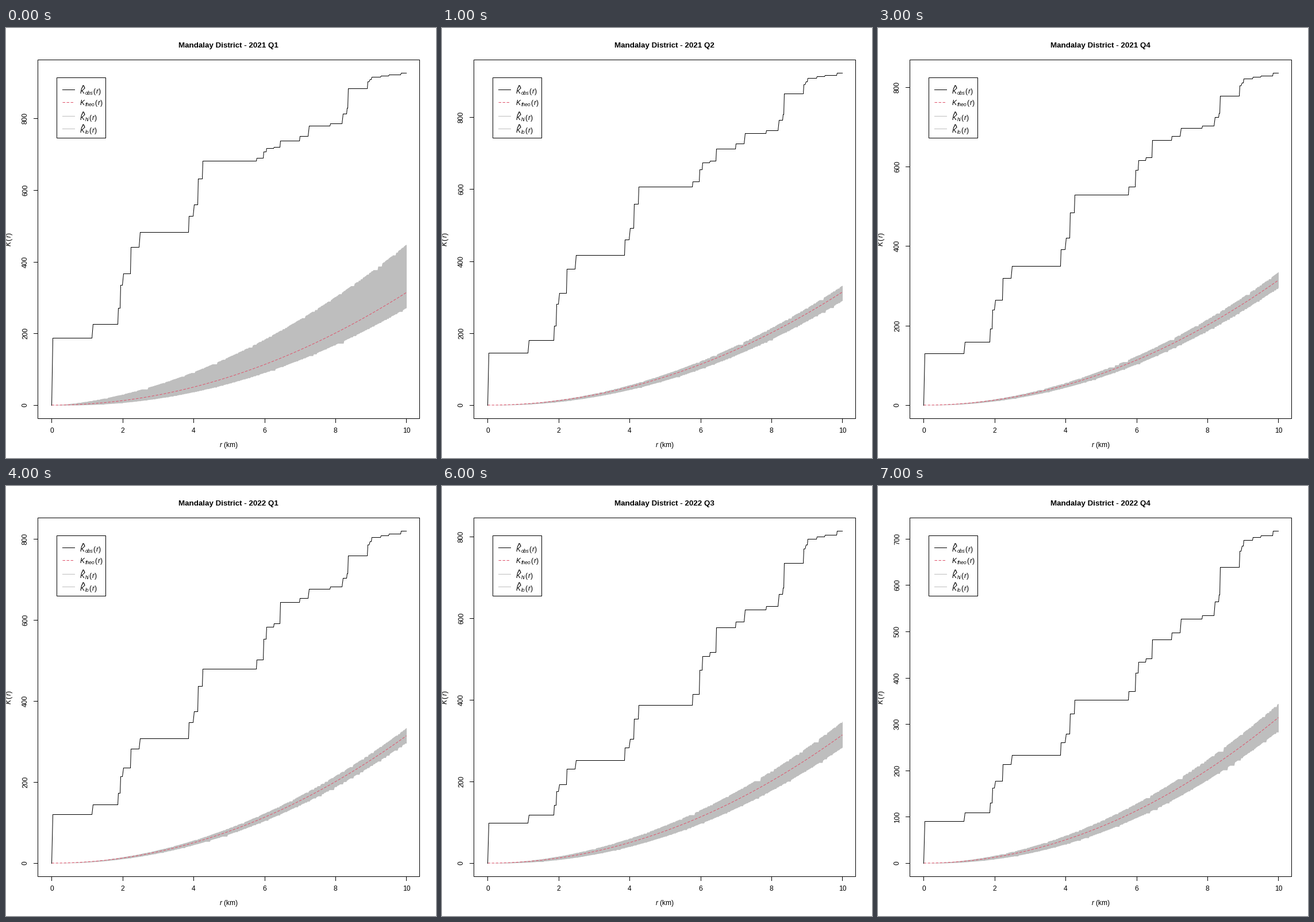
Recreate the animation shown at these times as a matplotlib script. Size 748x748 px, loop 8 s.

```python
import matplotlib.pyplot as plt
import numpy as np
from matplotlib.animation import FuncAnimation
from matplotlib.patches import Rectangle

SIZE = 748
PX = 0.72                      # points per pixel at 100 dpi
X0, KM = 79.5, 61.7            # pixel of r = 0, pixels per km
BASE, TOP = 656, 78            # pixel rows of K = 0 and of the largest K
GREY, RED = "#BEBEBE", "#DF536B"
DASH = (0, (4.5, 2.5))

plt.rcParams.update({
    "font.family": "Liberation Sans",
    "mathtext.fontset": "custom",
    "mathtext.rm": "Liberation Sans",
    "mathtext.it": "Liberation Sans:italic",
})

r = np.linspace(0, 10, 513)
xs = X0 + KM * r
theo = np.pi * r ** 2

# Jumps in km, grouped by the climb they belong to, and the part of
# that climb completed after each jump
CLIMBS = [
    ([0.01], [1]),
    ([1.15, 1.87, 1.93, 2.00, 2.21, 2.47], [.13, .28, .50, .61, .86, 1]),
    ([3.85, 3.99, 4.11, 4.25], [.23, .39, .75, 1]),
    ([5.77, 5.97, 6.04, 6.26, 6.44], [.14, .45, .63, .68, 1]),
    ([6.99, 7.23, 7.84, 8.20, 8.31, 8.34], [.09, .28, .33, .52, .62, 1]),
    ([8.90, 8.95, 9.02, 9.26, 9.50, 9.84], [.45, .58, .75, .82, .88, 1]),
]

# Quarter: K reached after each climb, then band width above and below
# the theoretical curve at 10 km; other quarters are interpolated
KEYS = {
    0: (188, 482, 681, 738, 884, 927, 135, 42),
    1: (145, 417, 607, 713, 866, 923, 19, 23),
    2: (140, 392, 580, 688, 795, 851, 22, 20),
    4: (121, 308, 479, 644, 759, 820, 20, 16),
    6: (99, 252, 387, 577, 735, 814, 34, 30),
    7: (91, 233, 352, 483, 639, 717, 31, 28),
}


def ragged(k, rng):
    """Hold values for short random runs, like an empirical curve."""
    i = np.arange(r.size)
    held = np.maximum.accumulate(np.where(rng.random(r.size) < 0.55, i, 0))
    return np.maximum(k[held], 0)


def build(n):
    *levels, above, below = [np.interp(n, list(KEYS), column)
                             for column in zip(*KEYS.values())]
    obs = np.zeros_like(r)
    start = 0
    for (jumps, parts), end in zip(CLIMBS, levels):
        for at, part in zip(jumps, parts):
            obs[r >= at] = start + part * (end - start)
        start = end
    rng = np.random.default_rng(n + 1)
    spread = (r / 10) ** 1.25
    high = ragged(theo + above * spread, rng)
    low = ragged(theo - below * spread, rng)
    return levels[-1], obs, high, low


curves = [build(n) for n in range(8)]

fig = plt.figure(figsize=(SIZE / 100, SIZE / 100), dpi=100, facecolor="white")
ax = fig.add_axes([0, 0, 1, 1])
ax.set_xlim(0, SIZE)
ax.set_ylim(SIZE, 0)
ax.axis("off")


def line(x, y, color="black", snap=True, **kw):
    return ax.plot(x, y, color=color, lw=PX, snap=snap,
                   dash_capstyle="butt", **kw)[0]


def label(x, y, s, size=12, ha="center", va="baseline", **kw):
    return ax.text(x, y, s, fontsize=size * PX, ha=ha, va=va, **kw)


def frame_box(x, y, w, h):
    ax.add_patch(Rectangle((x, y), w, h, fill=False, ec="black", lw=PX,
                           snap=True, zorder=4))


def legend_row(y, base, sub, end, hat=True, **style):
    line([98, 119], [y, y], **style)
    label(129, base, "K", ha="left", style="italic")
    label(138, base + 2, sub, size=8.7, ha="left", style="italic")
    if hat:
        label(134.5, base - 6, "^", weight="bold")
    label(end, base, r"$(\,r)$", ha="right")


band = ax.fill_between(xs, xs, xs, color=GREY, lw=0, antialiased=False)
theo_line = line([], [], RED, snap=False, ls=DASH)
obs_line = line([], [])

frame_box(55, 55, 664, 624)
frame_box(88, 86, 85, 105)
legend_row(107, 114, "obs", 166)
legend_row(129, 134, "theo", 169, hat=False, color=RED, ls=DASH)
legend_row(153, 160, "hi", 159, color=GREY)
legend_row(175, 182, "lo", 159, color=GREY)

for km in range(0, 11, 2):
    x = X0 + KM * km
    line([x, x], [679, 686])
    label(x, 704, str(km))
label(387, 729, "$r$ (km)")
label(6, 367.5, r"$K\,(\,r)$", va="center", rotation=90)

title = label(387, 33.5, "", size=13.33, weight="bold")
ticks = [(line([48, 55], [0, 0]),
          label(40, 0, "", ha="right", va="center", rotation=90))
         for _ in range(8)]


def draw(n):
    peak, obs, high, low = curves[n]

    def row(k):
        return BASE - k * (BASE - TOP) / peak

    title.set_text(f"Mandalay District - {2021 + n // 4} Q{n % 4 + 1}")
    obs_line.set_data(xs, row(obs))
    theo_line.set_data(xs, row(theo))
    band.set_verts([np.concatenate([np.column_stack([xs, row(high)]),
                                    np.column_stack([xs, row(low)])[::-1]])])

    step = 100 if peak < 750 else 200
    for i, (mark, text) in enumerate(ticks):
        k = i * step
        mark.set_visible(k <= peak)
        mark.set_ydata([row(k)] * 2)
        text.set_visible(k <= peak)
        text.set_y(row(k))
        text.set_text(str(k))
    return []


anim = FuncAnimation(fig, draw, frames=8, interval=1000, repeat=True,
                     repeat_delay=0, blit=False)
plt.show()
```
